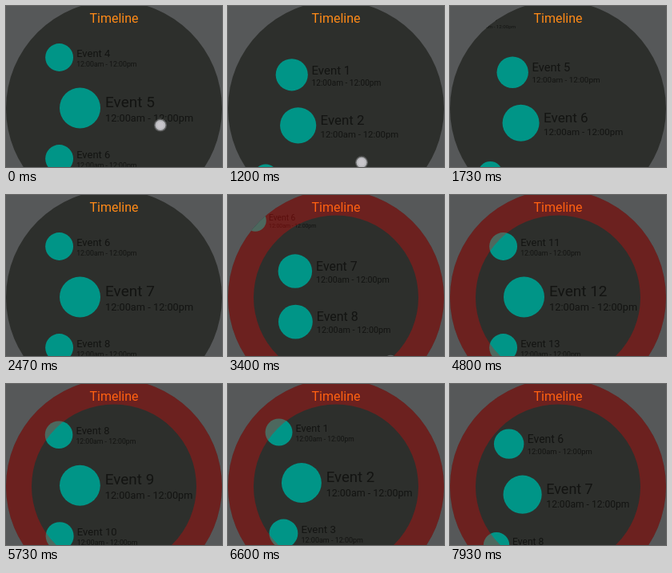
Write an HTML page with a canvas that moves like this. It is 270 px wide and 202 px high and loops after 8 s.

```html
<!DOCTYPE html>
<html lang="en">
<head>
<meta charset="utf-8">
<title>Timeline</title>
<style>
html, body { margin: 0; height: 100%; overflow: hidden; background: #565859; }
canvas { display: block; }
</style>
</head>
<body>
<canvas id="stage" width="270" height="202"></canvas>
<script>
const ctx = document.getElementById('stage').getContext('2d');
const LOOP = 8000, CX = 135, CY = 128.5, RADIUS = 135, SPACING = 63.5;
const BEZEL_START = 2730;

const fling = u => 1 - Math.exp(-6.2 * u * u);
const turn = u => u ** 1.1;

// Each gesture moves the list from wherever the previous one left it
const gestures = [
  { start: 70, length: 800, to: 1, ease: fling, touch: dragTouch(193, 149.5) },
  { start: 1000, length: 1470, to: 7, ease: fling, touch: dragTouch(167, 238) },
  { start: 3200, length: 1600, to: 12, ease: turn, touch: turnTouch },
  { start: 5070, length: 700, to: 9, ease: fling, touch: flickTouch },
  { start: 6000, length: 690, to: 2, ease: fling, touch: flickTouch },
  { start: 7470, length: 623, to: 7, ease: fling, touch: flickTouch }
];

function dragTouch(x, y) {
  return (u, moved) => u < 0.3 && drawTouch(x, y - moved * SPACING);
}

function turnTouch(u) {
  bezelTouch(10 + 315 * u, 120 - 38 * Math.sin(Math.PI * u));
}

function flickTouch(u, moved) {
  if (u < 0.23) bezelTouch(Math.sign(moved) * (220 * u - 25), 118);
}

function bezelTouch(degrees, r) {
  const angle = degrees * Math.PI / 180;
  drawTouch(CX + r * Math.cos(angle), CY + r * Math.sin(angle));
}

function disc(x, y, r, color) {
  ctx.fillStyle = color;
  ctx.beginPath();
  ctx.arc(x, y, r, 0, 2 * Math.PI);
  ctx.fill();
}

function label(text, x, y, size, color, align = 'left') {
  ctx.font = `${size}px Roboto, sans-serif`;
  ctx.textAlign = align;
  ctx.fillStyle = color;
  ctx.fillText(text, x, y);
}

function drawTouch(x, y) {
  disc(x, y, 8, 'rgba(190,190,195,.35)');
  disc(x, y, 6.5, 'rgba(215,215,220,.75)');
  disc(x, y, 4.5, '#c8c6cb');
}

// Items follow a curved edge and shrink away from the middle
function drawItem(index, focus) {
  const offset = (index - focus) * SPACING, d = Math.abs(offset);
  if (d > 121) return;
  const y = CY - 0.5 + offset;
  const scale = 1 - 0.0053 * d + 0.000005 * d * d;
  const r = 25.5 * scale;
  const left = Math.sqrt(122 * 122 - d * d) - 55;
  const textX = left + 2 * r + 6 * scale;
  disc(left + r, y, r, '#009587');
  label('Event ' + index, textX, y - scale, 19 * scale, '#131412');
  label('12:00am - 12:00pm', textX, y + 17 * scale, 12.8 * scale, '#131412');
}

function drawBezel(opacity) {
  ctx.fillStyle = `rgba(255,0,0,${0.3 * opacity})`;
  ctx.beginPath();
  ctx.arc(CX, CY, RADIUS, 0, 2 * Math.PI);
  ctx.arc(CX, CY, 103, 0, 2 * Math.PI);
  ctx.fill('evenodd');
}

function draw(t) {
  let focus = 5, showTouch = () => drawTouch(193, 149.5);
  for (const { start, length, to, ease, touch } of gestures) {
    if (t < start) break;
    const u = Math.min(1, (t - start) / length);
    const moved = u < 1 ? (to - focus) * ease(u) : to - focus;
    focus += moved;
    showTouch = () => u < 1 && touch(u, moved);
  }

  ctx.fillStyle = '#565859';
  ctx.fillRect(0, 0, 270, 202);
  disc(CX, CY, RADIUS, '#2d2f2c');

  ctx.save();
  ctx.beginPath();
  ctx.arc(CX, CY, RADIUS, 0, 2 * Math.PI);
  ctx.clip();
  for (let i = Math.max(1, Math.floor(focus) - 2); i < focus + 3; i++) drawItem(i, focus);
  ctx.restore();

  label('Timeline', CX, 21, 16, '#ff8a18', 'center');
  if (t >= BEZEL_START) drawBezel(Math.min(1, (t - BEZEL_START + 70) / 340));
  showTouch();
}

function tick() {
  draw(performance.now() % LOOP);
  requestAnimationFrame(tick);
}
tick();
</script>
</body>
</html>
```
